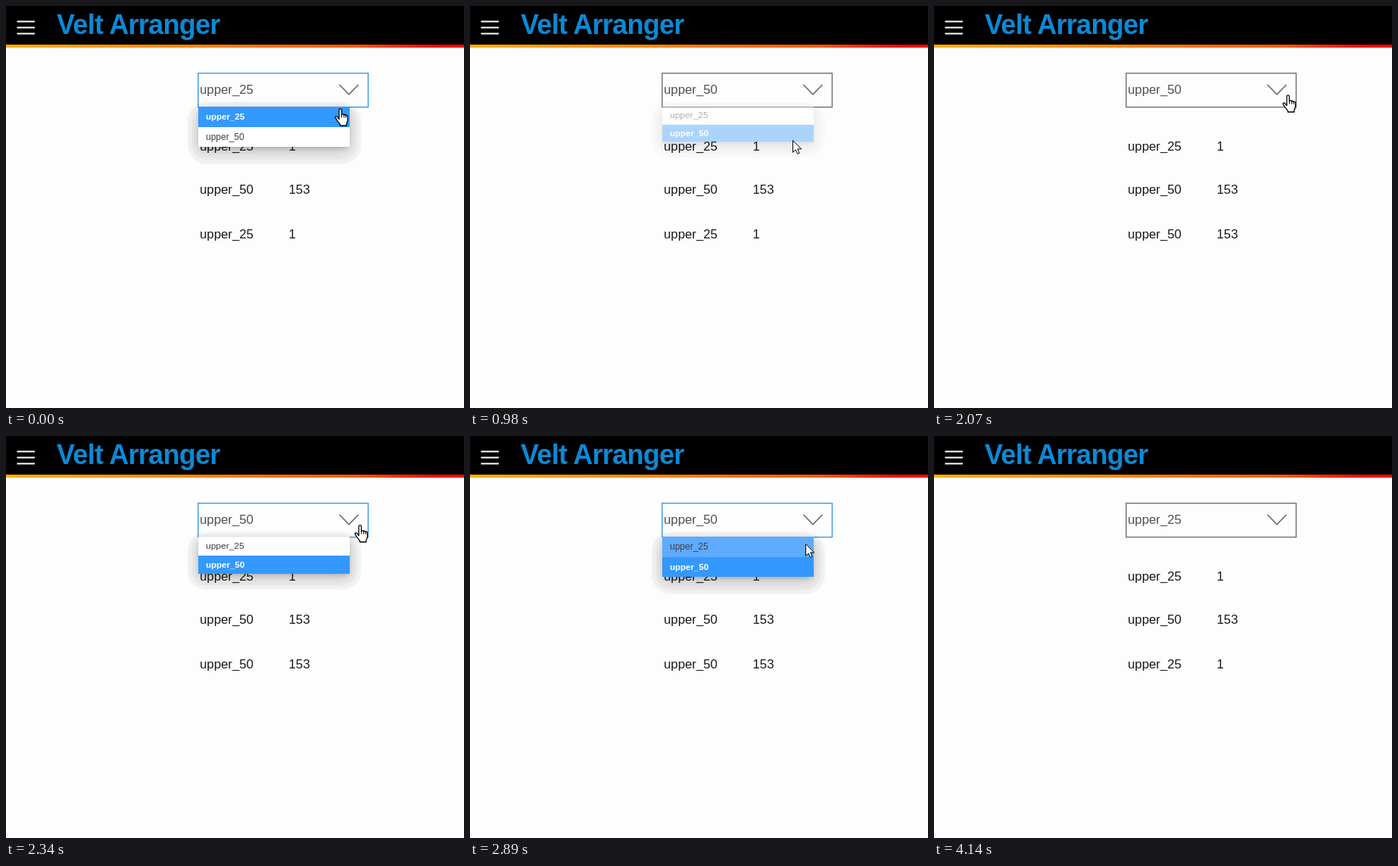
These frames come from a looping animation (605 px wide and 531 px high, 6.08 s). An HTML page:

```html
<!DOCTYPE html>
<html lang="en">
<head>
<meta charset="utf-8">
<title>Dropdown demo</title>
<style>
html, body { margin: 0; width: 100%; height: 100%; overflow: hidden; }
body { position: relative; background: #fdfdfd; font: 16.8px/20px "Liberation Sans", Arial, sans-serif; color: #181818; }
body > * { position: absolute; }
header { left: 0; top: 0; width: 100%; height: 51px; background: #000; }
header svg { position: absolute; left: 14px; top: 18px; }
h1 { position: absolute; left: 67px; top: 5px; margin: 0; font-size: 36px; line-height: 40px;
  letter-spacing: -.7px; color: #0a8ad6; white-space: nowrap; }
.stripe { left: 0; top: 51px; width: 100%; height: 4px;
  background: linear-gradient(90deg, #ffb000, #ff7a00 50%, #ff5a00 76%, #f00 95%); }
.text { white-space: nowrap; }
#select { left: 253px; top: 88px; width: 226px; height: 46px; overflow: visible; }
#value { left: 256px; top: 101px; color: #505050; }
#list { left: 254px; top: 133px; width: 200px; height: 53px; transform-origin: 50% 0; isolation: isolate;
  box-shadow: 0 6px 16px rgba(0,0,0,.2), 0 3px 6px -2px rgba(0,0,0,.16); }
#list::before, #list::after { content: ""; position: absolute; z-index: -1; background: rgba(0,0,0,.04); }
#list::before { inset: -6px -15px -23px -14px; border-radius: 26px; }
#list::after { inset: 0 -9px -17px -8px; border-radius: 20px; background: rgba(0,0,0,.025); }
.item { height: 26px; line-height: 26px; padding-left: 10px; font-size: 12px; color: #404040; background: #fff; }
.item:first-child { height: 27px; }
.item.on { color: #fff; font-size: 11.5px; font-weight: bold; }
.cursor { left: 0; top: 0; overflow: visible; }
.cursor path { fill: #fff; stroke: #000; stroke-linejoin: round; }
</style>
</head>
<body>
<header>
  <svg width="24" height="20" stroke="#fff" stroke-width="1.8"><path d="M.5 2.5H24M.5 10.5H24M.5 18.5H24"/></svg>
  <h1>Velt Arranger</h1>
</header>
<div class="stripe"></div>
<svg id="select" fill="none" stroke-width="1.4">
  <rect id="frame" x=".8" y=".8" width="224.6" height="44.8"/>
  <path d="M187.5 16L200 28.8L212.5 16" stroke="#6a6a6a" stroke-width="1.6"/>
</svg>
<div class="text" id="value"></div>
<div class="text" style="left:256px;top:176px">upper_25</div>
<div class="text" style="left:373.5px;top:176px">1</div>
<div class="text" style="left:256px;top:233px">upper_50</div>
<div class="text" style="left:373.5px;top:233px">153</div>
<div class="text" id="label" style="left:256px;top:292px"></div>
<div class="text" id="count" style="left:373.5px;top:292px"></div>
<div id="list"><div class="item">upper_25</div><div class="item">upper_50</div></div>
<svg class="cursor" id="arrow" width="12" height="19">
  <path d="M.5.6V16.3L4.1 12.9L6.6 18.4L9.1 17.3L6.7 11.9H11.6Z"/>
</svg>
<svg class="cursor" id="hand" width="18" height="24">
  <path stroke-width="1.3" d="M6 14.5V2.7c0-2.4 3.4-2.4 3.4 0V9c.2-1.6 3-1.5 3 .3.3-1.3 2.6-1 2.6.6.5-1 2.4-.6 2.4 1V16c0 2-1.6 3.5-1.6 5V23H7.4V21.5C6 19.5 4.5 18 3 15.5 2 13.8.8 12.8 1 11.8c.4-1.5 2.4-1 3 0Z"/>
  <path d="M9.4 9V12.5M12.4 9.3V12.5M15 10V12.8"/>
</svg>
<script>
const LOOP = 6080;
const names = ["upper_25", "upper_50"];
const counts = ["1", "153"];
const $ = id => document.getElementById(id);
const items = document.querySelectorAll(".item");

const arrow = (x, y) => ({ cursor: "arrow", x, y });
const hand = (x, y) => ({ cursor: "hand", x, y });
const closed = { focus: false, fade: 0, hover: -1 };

// Each step changes only the listed parts of the state.
const steps = [
  [0, { value: 0, label: 0, count: 0, picked: 0, focus: true, fade: 1, scale: 1, hover: -1, glow: 0, ...hand(434, 135) }],
  [150, arrow(429, 161)],
  [300, { hover: 1, glow: .5, ...arrow(427, 178) }],
  [430, { glow: 1, ...arrow(426, 183) }],
  [700, arrow(426, 180)],
  [830, arrow(426, 177)],
  [980, { value: 1, picked: 1, hover: -1, focus: false, fade: .4, scale: .88 }],
  [1100, { label: 1, ...closed }],
  [1250, { count: 1 }],
  [1400, arrow(460, 153)],
  [1530, arrow(465, 147)],
  [1670, hand(462, 128)],
  [1790, hand(463, 125)],
  [2070, hand(460, 117)],
  [2340, { focus: true, fade: 1, scale: .925 }],
  [2470, { scale: 1 }],
  [2620, { hover: 0, glow: .5, ...arrow(443, 142) }],
  [2770, { glow: 1 }],
  [2900, { value: 0, picked: 0, hover: -1 }],
  [3020, { label: 0, focus: false, fade: .4, scale: .88 }],
  [3170, { count: 0, ...closed }],
  [3720, arrow(458, 290)],
  [3850, arrow(481, 456)],
  [4000, arrow(505, 517)],
  [4140, { cursor: "" }]
];

function stateAt(time) {
  const state = {};
  for (const [at, change] of steps) if (at <= time) Object.assign(state, change);
  return state;
}

const mix = (a, b, k) => `rgb(${a.map((v, i) => Math.round(v + (b[i] - v) * k))})`;

function draw(s) {
  $("value").textContent = names[s.value];
  $("label").textContent = names[s.label];
  $("count").textContent = counts[s.count];
  $("frame").setAttribute("stroke", s.focus ? "#3798ea" : "#6e6e6e");
  $("list").style.opacity = s.fade;
  $("list").style.transform = `scaleY(${s.scale})`;
  items.forEach((item, i) => {
    const on = i === s.picked;
    item.classList.toggle("on", on);
    item.style.background = on ? "#3399ff" : mix([255, 255, 255], [94, 171, 255], i === s.hover ? s.glow : 0);
  });
  for (const id of ["arrow", "hand"]) {
    $(id).style.visibility = s.cursor === id ? "visible" : "hidden";
    $(id).style.transform = `translate(${s.x}px, ${s.y}px)`;
  }
}

const start = performance.now();
function tick() {
  draw(stateAt((performance.now() - start) % LOOP));
  requestAnimationFrame(tick);
}
tick();
</script>
</body>
</html>
```
